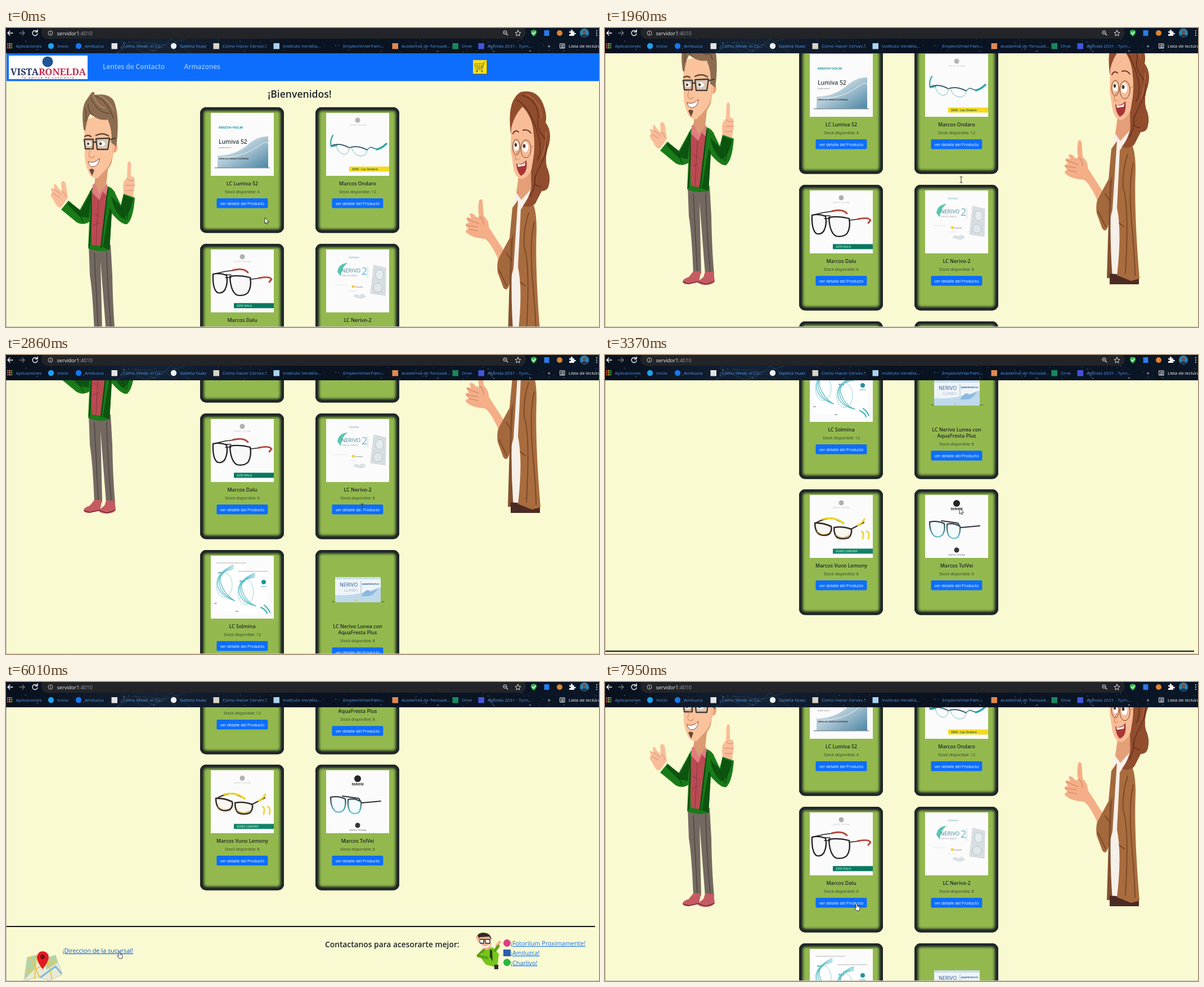
An HTML page for the animation above (8000 ms loop, 1054 by 532 pixels).

```html
<!DOCTYPE html>
<html lang="es">
<head>
<meta charset="utf-8">
<title>Tienda de lentes</title>
<style>
html, body { margin: 0; width: 100%; height: 100%; overflow: hidden; background: #fafad2; }
svg { display: block; position: absolute; left: 0; top: 0; }
text { font-family: "Open Sans", "Noto Sans", sans-serif; white-space: pre; }
</style>
</head>
<body>
<svg id="stage" width="1054" height="532" viewBox="0 0 1054 532"></svg>
<script>
const path = (d, fill = 'none', stroke = 'none', w = 1) =>
  `<path d="${d}" fill="${fill}" stroke="${stroke}" stroke-width="${w}" stroke-linecap="round" stroke-linejoin="round"/>`;
const line = (d, color, w) => path(d, 'none', color, w);
const rect = (x, y, w, h, fill, r = 0) => `<rect x="${x}" y="${y}" width="${w}" height="${h}" rx="${r}" fill="${fill}"/>`;
const oval = (x, y, rx, ry, fill, extra = '') => `<ellipse cx="${x}" cy="${y}" rx="${rx}" ry="${ry}" fill="${fill}" ${extra}/>`;
const dot = (x, y, r, fill) => oval(x, y, r, r, fill);
const text = (x, y, size, str, fill, extra = '') => `<text x="${x}" y="${y}" font-size="${size}" fill="${fill}" ${extra}>${str}</text>`;
const move = (x, y, body) => `<g transform="translate(${x} ${y})">${body}</g>`;
const MID = ' text-anchor="middle" ', SEMI = ' font-weight="600" ', BOLD = ' font-weight="700" ', ITALIC = ' font-style="italic" ';

const defs = `<defs>
  <clipPath id="round"><rect width="149" height="223.5" rx="11"/></clipPath>
  <filter id="soft" x="-20%" y="-20%" width="140%" height="140%"><feGaussianBlur stdDeviation="2"/></filter>
  <linearGradient id="wave" x2="1" y2="1"><stop stop-color="#e9f0f3"/><stop offset=".45" stop-color="#b4ccd9"/><stop offset="1" stop-color="#4c86a4"/></linearGradient>
  <linearGradient id="fade" x2="0" y2="1"><stop stop-color="#222b33"/><stop offset="1" stop-color="#69c9e0"/></linearGradient>
  <linearGradient id="bar" x2="1"><stop stop-color="#080f1c"/><stop offset=".25" stop-color="#142235"/><stop offset=".5" stop-color="#091220"/><stop offset="1" stop-color="#0b1626"/></linearGradient>
</defs>`;

// Product pictures, each 112 by 112.
const white = rect(0, 0, 112, 112, '#fbfbfb');
const shopMark = (y, color) => dot(56, y, 4.5, color) + text(56, y + 10, 3.2, 'LENTES TESORA', color, MID + 'letter-spacing=".5"');
const banner = (fill, ink, str) => rect(41, 95.5, 71, 9, fill) + text(46, 102, 5.2, str, ink, BOLD);

const pictures = [
  white + text(14, 27.5, 6, 'KRESTA+VOLM', '#1497a5', BOLD) +
    path('M12 76Q46 76 70 53Q86 41 102 42V97H12Z', 'url(#wave)') +
    line('M20 80Q58 78 80 62T102 56', '#eef4f7', 1) +
    text(14, 55, 10.3, 'Lumiva 52', '#333e45', SEMI) + text(14, 63, 4, '(polimacon)', '#777') +
    text(14, 83, 3.3, 'LENTES DE CONTACTO ESFERICAS', '#333', BOLD) +
    rect(7, 97, 98, 1.5, '#7b9099'),
  white + shopMark(13, '#b5b5b5') +
    line('M12 40Q6 50 9 60L19 58', '#30a5a8', 2.2) +
    line('M10 58Q25 53 41 62Q56 57 73 66', '#234e60', 1.7) +
    line('M18 58Q20 71 32 74Q41 73 41 62M45 62Q49 76 62 77Q73 75 73 66', '#77bdc3', 1) +
    line('M73 65L79 61L91 65', '#326f79', 1.4) + line('M90 65Q99 63 107 55', '#30a5a8', 3.4) +
    banner('#f5d91f', '#376c38', '$850 - Las Ondaro'),
  white + shopMark(13, '#b0b0b0') +
    path('M4 44Q16 41 28 46Q31 60 25 72Q20 79 12 77Q3 71 4 44ZM34 48Q51 45 70 50Q73 66 66 77Q58 84 46 81Q35 74 34 48Z', '#f8f8f8', '#211f22', 2.3) +
    line('M4 44L26 39L43 37M26 45H36M26 50H36M71 53L88 51', '#211f22', 1.6) +
    line('M39 37Q58 32 66 41M85 51Q104 47 108 53L104 58', '#b4483c', 3) +
    banner('#09775f', '#8be1c8', '$255 DALU'),
  white + text(40, 16, 4.5, 'clarivona', '#6fa9b4', ITALIC) +
    path('M20 40Q22 25 38 24Q27 32 26 48Z', '#56c6b0') +
    text(27, 41, 9.6, 'NERIVO', '#4b8399') + text(63, 45, 18, '2', '#65b6d2') +
    text(28, 48, 2.7, 'LENTES DE CONTACTO', '#8a9ca2') +
    line('M74 30V50', '#aaa', .5) + dot(48, 66, 2.5, '#f4cf35') + text(51, 68, 3.7, 'Visanela', '#666') +
    path('M85 28L106 33L105 82L79 78L82 52Z', '#d7dee1', '#c2cbd0', .6) +
    oval(95, 45, 7, 9, '#e6ecee', 'stroke="#b8c3c8"') + oval(92, 68, 8, 8, '#e0e6e9', 'stroke="#b8c3c8"') +
    path('M48 84Q53 76 59 82Q66 75 71 85L62 88Z', '#dae1e4') + line('M14 63H37M40 74H54', '#d4dadd', .7),
  white + rect(9, 13, 50, 85, '#fff') + rect(48, 28, 53, 76, '#fff') +
    line('M11 13H62M50 28H101', '#d6d6d6', 2.2) +
    [0, 38].map(x => text(13 + x, 32 + x / 2.6, 6, 'soli', '#17879a', BOLD) +
      [0, 3, 6].map(k => line(`M${40 + x} ${17 + x / 2.6 + k}Q${11 + x} ${30 + x / 3} ${12 + x + k} ${50 + x / 3}T${42 + x} ${80 + x / 4}`, '#4eb9c4', 1.2)).join('') +
      oval(24 + x, 52 + x / 3, 14, 22, 'none', 'stroke="#93d3d7"')).join('') +
    dot(94, 47, 4, '#21949e') + text(94, 56, 3, 'solmina', '#17879a', MID) +
    line('M89 92Q99 97 100 103M95 88Q103 95 105 101', '#38b5bc', 2) + line('M7 85H10M45 99H48', '#888', 1.5),
  line('M11 82H103', '#657c3e', 1.5) + rect(16, 38, 81, 45, '#eef4f8') + rect(16, 38, 81, 4, '#c9dfeb') +
    path('M16 70Q52 73 97 56V83H16Z', '#bed9eb') + path('M62 72Q72 56 79 64Q87 62 93 57Q85 71 75 72Z', '#8bb9df') +
    text(24, 55, 9, 'NERIVO', '#245797') + text(32, 64, 8, 'LUNEA', '#7791a5', 'font-weight="300"') +
    line('M62 45V66', '#708ca3', .6) + text(64, 52, 3.3, 'AQUAFRESTA PLUS', '#234f88', BOLD) + dot(53, 80, 2, '#d9cc65'),
  white + shopMark(14, '#b0b0b0') +
    line('M9 51Q27 40 43 42L60 50M73 61L96 49', '#393027', 2.2) +
    line('M23 43Q47 38 60 51M85 54Q92 52 97 43', '#efd51c', 3) +
    path('M9 50Q23 49 38 56Q40 64 34 70Q26 74 17 70Q9 65 9 50ZM43 58Q58 55 74 61Q75 71 69 76Q59 80 49 76Q43 71 43 58Z', '#f8f6f0', '#352b24', 2.6) +
    line('M13 65Q22 74 34 68M46 71Q57 80 70 72', '#c0952c', 1.2) +
    line('M92 65Q97 66 94 78M101 65Q107 66 104 78', '#efd647', 3) +
    banner('#128268', '#8ee1b7', 'VUNO LEMONY'),
  white + dot(56, 15, 6, '#242424') + text(56, 27, 6.5, 'tolveia', '#222', MID + BOLD + ITALIC) +
    line('M29 46L58 50L63 58M64 58L97 55', '#303138', 2) +
    path('M8 48Q21 45 34 51Q36 63 31 71Q24 77 16 73Q8 66 8 48ZM39 52Q51 49 62 56Q63 68 58 75Q50 80 43 74Q38 68 39 52Z', '#f2fafb', 'url(#fade)', 2.2) +
    shopMark(98, '#353535')
];

const titles = [['LC Lumiva 52'], ['Marcos Ondaro'], ['Marcos Dalu'], ['LC Nerivo-2'], ['LC Solmina'],
  ['LC Nerivo Lunea con', 'AquaFresta Plus'], ['Marcos Vuno Lemony'], ['Marcos TolVei']];
const stock = [4, 12, 6, 8, 12, 8, 8, 6];

const card = i => {
  const names = titles[i], drop = (names.length - 1) * 11.2;
  return move(345 + i % 2 * 205, [141, 384, 627, 869][i >> 1],
    `<g clip-path="url(#round)">${rect(0, 0, 149, 223.5, '#93b94e')}
      <rect width="149" height="223.5" rx="11" fill="none" stroke="#1d2520" stroke-width="13" filter="url(#soft)"/></g>
      <rect x="2" y="2" width="145" height="219.5" rx="9" fill="none" stroke="#20272a" stroke-width="4"/>` +
    move(19, 10, pictures[i]) +
    names.map((s, k) => text(75, 138.5 + k * 11.2, 8.9, s, '#212529', MID + SEMI)).join('') +
    move(0, drop, text(75, 152.6, 7.1, 'Stock disponible: ' + stock[i], '#35402c', MID) +
      rect(29.4, 162, 91, 17.5, '#0d6efd', 2) + text(75, 173.6, 7.1, 'ver detalle del Producto', '#fff', MID)));
};

const man =
  path('M147 386H186L189 440Q190 500 194 543H178L168 415L171 542H157Q154 470 149 440Z', '#736961') +
  line('M157 400Q160 465 164 538M179 398Q180 460 187 538', '#514943', 1.6) +
  path('M157 538H171L168 551L167 557L148 561Q138 561 138 556Q139 551 149 548ZM178 539H193L195 555Q192 562 180 562Q166 562 165 556L175 548Z', '#c55b62') +
  line('M139 557L149 560L167 556M166 557L180 561L194 556', '#762f39', 1.5) +
  path('M98 319Q91 321 86 309L80 299Q78 296 82 294L80 286Q81 283 86 287L85 278Q88 276 92 284L99 291L98 275Q102 269 106 276L110 302Z', '#f9bd99') +
  line('M83 294L95 301M86 287L98 296M100 291Q105 292 106 300', '#d08d70', 1) +
  path('M209 300L208 279Q209 271 215 267L216 240Q220 234 222 241V264Q230 265 228 271L229 281L227 289L226 302Z', '#f9bd99') +
  line('M215 267Q219 274 228 271M213 280H228M213 289H227', '#ce8b6e', 1) +
  path('M153 284L179 281Q191 284 195 296L204 315L209 295L229 302Q226 341 215 349Q206 351 188 330L184 395Q165 400 146 392L148 345Q137 352 126 346L98 323L111 307L131 324Z', '#197b18') +
  path('M152 290L133 325L112 309L109 314L130 335L147 338ZM187 300Q191 325 207 339Q219 335 226 304L209 297L205 318ZM172 390L184 320L188 325L184 395Z', '#0d5410') +
  path('M155 280L178 280L178 305Q173 340 168 388L153 386Q150 335 153 300Z', '#ba4a52') +
  path('M160 254L181 252L178 280L166 297L157 279Z', '#dc9a72') +
  path('M154 279L158 276L166 295L180 277L181 300L172 291L166 306L153 293Z', '#df7d80') +
  line('M164 306L160 386M156 330L167 336M155 351L166 347', '#853640', 1) +
  line('M181 287L169 390M150 291Q154 320 148 388', '#0b4512', 2) +
  line('M129 328L137 345M204 322L213 342M218 320L215 340', '#0a4711', 1.3) +
  oval(192, 212, 6, 10, '#eca27c') +
  path('M139 165Q166 150 192 170Q195 220 187 240Q176 259 163 267Q151 269 146 255Q138 235 140 218Z', '#fac39b') +
  path('M190 205Q191 232 182 246Q174 256 163 267Q180 259 188 239Z', '#dc9c75') +
  path('M138 181Q133 146 141 131L147 122L152 115Q157 111 158 119Q183 115 192 130Q203 158 196 211L187 204Q190 184 181 163Q165 166 150 153Q144 160 141 183Z', '#8c6c50') +
  line('M146 136Q146 148 154 155M151 126Q165 152 184 152M159 121Q181 130 191 161M141 144Q144 155 141 166', '#5f4636', 1.5) +
  line('M155 117Q160 138 176 143M165 120Q183 127 192 148', '#b08c6c', 1.5) +
  line('M140 193Q145 189 151 193M160 191Q172 185 182 192', '#654631', 2.5) +
  path('M139 198H155V215H141ZM160 197L184 196L181 216H162Z', '#d9c7b4', '#493c36', 2.3) + line('M155 203H160M184 199L194 196', '#493c36', 2.3) +
  oval(147, 206, 4.5, 4, '#fff') + oval(170, 206, 6, 4.5, '#fff') + dot(146, 206, 2.2, '#543c2c') + dot(168, 206, 2.4, '#543c2c') +
  line('M153 211Q145 224 148 229Q153 233 157 228', '#d98e68', 1.3) +
  path('M146 238Q157 242 166 232Q165 247 153 247Q147 245 146 238Z', '#fff', '#8a4636', 1) +
  path('M148 252Q153 248 157 253L153 263Z', '#6a4a36');

const woman =
  path('M915 114Q947 107 957 142Q962 158 959 168Q971 184 965 208Q957 229 961 247Q969 265 965 278Q962 290 952 290L940 313Q928 322 919 316Q925 295 921 270L897 186Q890 128 915 114Z', '#914d2d') +
  path('M912 257L933 250L934 300L920 316L906 300Z', '#e59f78') +
  path('M906 292L916 306L933 287L935 326Q917 432 915 543L897 544Q891 430 896 350Z', '#f6f0e9') +
  path('M885 436Q865 383 851 375Q835 374 825 369L818 364Q815 359 822 358L817 351Q816 347 823 347L818 339Q821 335 827 339L824 331Q829 327 835 336L841 337Q838 319 841 307Q843 302 847 307L849 334Q859 344 858 354L897 415Z', '#f4ae88') +
  line('M818 351L838 354M820 340L840 348M823 358L839 361M841 335Q848 338 849 350', '#c98060', 1.2) +
  path('M910 306L900 320L895 374L875 411Q872 421 874 435L884 462Q890 470 894 458L902 428L908 335Z', '#a3683c') +
  path('M897 378L892 550L902 550Q895 460 902 366Z', '#83502f') +
  path('M897 542L949 546V561H897Z', '#4b2b23') +
  path('M915 323L929 301Q943 312 943 358Q940 431 950 551L935 555L910 545Q919 468 910 425Z', '#a86c3e') +
  line('M876 430L890 459M889 400L899 414M929 329Q919 360 921 390Q932 420 925 542M939 345Q930 380 936 450T942 546M914 452L923 459', '#754424', 1.6) +
  path('M898 174Q900 149 918 138Q938 152 942 187L940 229Q936 261 918 269Q906 268 902 249L897 217Z', '#f8bd97') +
  path('M918 140Q936 158 938 190Q941 214 936 240Q932 258 936 272Q932 300 919 316Q930 322 941 312L952 290Q964 290 965 278Q968 262 961 247Q957 229 965 205Q970 185 959 168L957 142Q945 112 915 114Q893 126 897 184Q901 158 918 140Z', '#914d2d') +
  line('M917 120Q944 126 946 158Q941 177 955 193T949 246T951 282M908 128Q928 138 942 178T944 235M932 300Q942 280 940 263', '#633020', 1.5) +
  line('M925 118Q951 130 952 160M960 185Q960 210 953 230', '#b06a42', 1.5) +
  line('M901 188Q905 180 911 185M919 182Q927 179 933 187', '#6b3423', 2) +
  oval(907, 210, 4.5, 8, '#fff') + oval(923, 212, 5.5, 9, '#fff') + oval(906, 208, 2.2, 3.2, '#543a2b') + oval(921, 210, 2.4, 3.4, '#543a2b') +
  oval(907, 212, 6.5, 14, 'none', 'stroke="#70432f"') + oval(924, 215, 9, 16, 'none', 'stroke="#70432f"') +
  line('M933 213L938 209M910 219Q902 230 907 235L912 233', '#d28b69', 1.3) +
  path('M907 241Q917 245 925 235Q928 258 915 263Q908 256 907 241Z', '#a93736') + path('M909 242Q917 245 923 239L922 245L910 247Z', '#fff');

const navbar = rect(0, 45, 1054, 49.5, '#0d6efd') + rect(5, 49, 140, 42, '#fff') + dot(74, 60, 9.5, '#1c5596') +
  text(75, 84, 16.6, 'VISTA<tspan fill="#c22a4c">RONELDA</tspan>', '#233565', MID + BOLD + 'style="font-family:\'Noto Serif\',serif"') +
  text(75, 89.5, 6, 'Tu óptica de confianza', '#863848', MID + ITALIC + 'letter-spacing="1.6"') +
  text(172, 73, 11.9, 'Lentes de Contacto', '#9cc5ff', SEMI) + text(316.5, 73, 11.9, 'Armazones', '#9cc5ff', SEMI) +
  rect(830, 57, 25, 25, '#f7df18') + line('M830 82H855V57', '#444022', .8) +
  line('M853 60L850 61L846 74H835M833 64L849 63L847 71L836 72ZM837 64L839 72M842 64V72M846 64L845 71M834 68H848', '#777026', .8) +
  dot(837, 77, 1.5, '#5f5a20') + dot(846, 77, 1.5, '#5f5a20');

const link = (x, y, str, id = '') => text(x, y, 10.9, str, '#0d6efd', `text-decoration="underline" ${id}`);
const footer = move(0, 722,
  rect(0, 434, 1047, 2, '#111') +
  text(567, 472, 13.8, 'Contactanos para acesorarte mejor:', '#212529', SEMI) +
  link(100.5, 482, '¡Direccion de la sucursal!', 'id="address"') +
  link(897, 469, '¡Fotorilum Proximamente!') + link(897, 486, '¡Amiluzca!') + link(897, 503.5, '¡Charlivo!') +
  dot(890.5, 464.5, 6.5, '#d83f83') + rect(884, 476, 13, 12, '#285fb0') + dot(890.5, 499, 6.5, '#2bb641') +
  path('M38 490L54 486L69 492L88 486L100 521L77 531L58 525L32 532Z', '#e8ead5', '#c6cbb9', 1) +
  path('M38 490L54 486L51 511L33 529ZM69 492L88 486L91 500L72 512Z', '#b2d3a3') +
  line('M35 516L91 497M43 489L60 526M74 492L82 529M54 487L51 528', '#f0c64e', 2) + line('M62 525L88 506L98 518', '#7bb9d7', 3) +
  path('M65 511Q54 496 55 489Q57 479 65 479Q75 480 76 489Q76 497 65 511Z', '#e21b22') + dot(65, 489, 4, '#6f1518') +
  path('M850 474L865 472L876 484L873 508L853 503L844 491Z', '#76c51c') + path('M870 476L881 462L876 460L870 468Z', '#f2b68d') +
  line('M849 477L839 487L855 491M869 478L875 470', '#5ba310', 5) + path('M860 476L864 477L865 497L860 489Z', '#26391c') + rect(868, 503, 7, 8, '#303030') +
  path('M840 454Q850 449 861 454L862 469Q858 481 848 474Z', '#f0b58c') + path('M838 459Q835 447 847 446Q862 446 863 459L859 453L842 454Z', '#332b28') +
  path('M841 458H849V465H843ZM851 458H860V465H853Z', '#fff', '#25211f', 1.4) + line('M846 470Q854 474 859 468', '#fff', 2) +
  line('M840 460L837 453', '#f0b58c', 4));

// Browser bars
let seed = 7;
const rand = () => (seed = seed * 16807 % 2147483647) / 2147483647;
const stars = Array.from({length: 130}, () => dot(rand() * 1054, 19 + rand() * 25, .2 + rand() * .65, ['#5d8daa', '#36546c', '#a7bdc9'][rand() * 3 | 0])).join('');
const bookmarks = [
  [91, 'Inicio', '#1da1f2', 1], [140, 'Amiluzca', '#1877f2', 1], [204, '¿Cómo Medir el Co...', '#e4e4e4', 0],
  [309, 'Galleta Nuez', '#f1f1f1', 1], [385, 'Cómo Hacer Cervez...', '#d8d2c7', 0], [492, 'Instituto Verdela...', '#a7d4f2', 0],
  [599, 'EmpleoVirtal Pam...', '', 0], [703, 'Academia de Torcuad...', '#df8950', 0], [810, 'Orve', '#16885f', 0], [856, 'Agenda 2031 - Turn...', '#4355d8', 0]
];
const bars = rect(0, 0, 1054, 45, 'url(#bar)') + stars +
  line('M197 45L228 25L264 42L294 19L328 44M205 23L249 45L281 30L318 20M228 25L281 30L303 43', '#45677e88', .7) +
  rect(63, -4, 861, 23, '#222428', 11) +
  line('M12 9H3M7 5L3 9L7 13', '#fff', 1.3) + line('M24 9H33M29 5L33 9L29 13', '#74777b', 1.3) +
  line('M55 6A4.5 4.5 0 1 0 56 10M56 3V7H52', '#f3f3f3', 1.4) +
  oval(79, 9, 4, 4, 'none', 'stroke="#bfc1c4"') + line('M79 8.7V11M79 6.8V7', '#ccc', 1) +
  text(90.5, 12.5, 9.1, 'servidor1<tspan fill="#9fa2a6">:4010</tspan>', '#f0f0f0') +
  oval(887, 8, 3.2, 3.2, 'none', 'stroke="#ddd"') + line('M889.5 10.5L892 13M885.5 8H888.5', '#ddd', 1.1) +
  line('M910 4L911.5 7.5L915 8L912.2 10.4L913 14L910 12L907 14L907.8 10.4L905 8L908.5 7.5Z', '#e5e5e5', 1) +
  path('M933 5L938 3L943 5Q944 11 938 15Q932 11 933 5Z', '#35b64b') + line('M935.5 8.5L937.5 11L941 7', '#fff', 1.3) +
  rect(956.5, 4, 9, 10, '#297bea') + dot(984, 9, 5, '#df852e') +
  path('M1001 6H1004Q1003 3 1005 3Q1008 3 1007 6H1010V9Q1013 8 1013 10Q1013 12 1010 11V14H1001V11Q1004 11 1004 9.5Q1004 8 1001 8Z', '#f3f3f3') +
  dot(1028, 9, 8, '#2386b8') + dot(1028, 7, 3.3, '#7a5140') + path('M1022 14Q1028 8 1034 14L1031 16.5H1025Z', '#283447') +
  [5, 9, 13].map(y => dot(1050, y, 1, '#fff')).join('') +
  Array.from({length: 9}, (_, i) => rect(2 + i % 3 * 3.5, 27 + (i / 3 | 0) * 3.5, 2.3, 2.3, ['#e64c40', '#f0bd35', '#46a85b'][i % 3])).join('') +
  text(17.5, 35, 8, 'Aplicaciones', '#5298ea') +
  bookmarks.map(([x, s, color, round]) => text(x, 35, 8, s, '#5298ea') +
    (color && (round ? dot(x - 11, 32, 5.2, color) : rect(x - 16.5, 27, 10.5, 10.5, color)))).join('') +
  text(963, 34.5, 9, '»', '#fff') + line('M985 28H993V36H985ZM987 30.5H991M987 32.5H991M987 34.5H991', '#f3f3f3', 1) +
  text(1000, 35, 8, 'Lista de lectura', '#fff');

const pointers = {
  arrow: path('M0 0V10L2.4 7.8L4 11L5.6 10.2L4.1 7.2H7.2Z', '#fff', '#111', .8),
  beam: line('M-2 -5H2M0 -5V5M-2 5H2', '#333', 1),
  hand: path('M2 1Q3.5 -.8 4.3 1V5L8 6Q9.5 6.5 9 9L8 13H3L0 9Q-.7 7 2 8Z', '#fff', '#111', .8)
};

const stage = document.getElementById('stage');
stage.innerHTML = defs + `<g id="page">${navbar}${text(522, 124, 17.6, '¡Bienvenidos!', '#212529', MID + SEMI)}
  ${man}${woman}${titles.map((_, i) => card(i)).join('')}${footer}</g>` +
  rect(0, 45, 1, 487, '#b9b9ae') + rect(0, 531, 1054, 1, '#c8c8b9') + bars + '<g id="pointer"></g>';

// The screen refreshes only at these times (ms).
const ticks = [0, 150, 270, 420, 570, 720, 840, 990, 1110, 1230, 1350, 1470, 1590, 1840, 1960, 2100, 2220, 2620, 2740, 2860,
  3110, 3250, 3370, 3490, 3610, 3760, 4040, 4180, 4300, 4420, 4540, 4690, 4810, 4960, 5080, 5200, 5320, 5470, 5590, 5740,
  5890, 6010, 6280, 6400, 6530, 6650, 6790, 6910, 7030, 7180, 7320, 7440, 7560, 7680, 7830, 7950];
const scrollKeys = [[0, 0], [1590, 0], [1840, 35], [1960, 105], [2100, 133], [2220, 140], [2620, 176], [2740, 245], [2860, 280],
  [3110, 330], [3250, 490], [3370, 630], [3490, 660], [3610, 700], [3760, 722], [6010, 722], [6280, 705], [6400, 680],
  [6650, 652], [6790, 582], [6910, 440], [7030, 371], [7180, 200], [7680, 162]];
const pointerKeys = [[0, 460, 338, 'arrow'], [270, 468, 328, 'arrow'], [420, 477, 322, 'arrow'], [570, 513, 269, 'arrow'],
  [720, 470, 256, 'arrow'], [840, 433, 304, 'arrow'], [990, 374, 321, 'arrow'], [1110, 430, 315, 'arrow'], [1350, 600, 310, 'arrow'],
  [1470, 644, 285, 'arrow'], [1590, 633, 270, 'beam'], [3110, 633, 270, 'beam'], [3250, 630, 273, 'arrow'], [3490, 630, 273, 'arrow'],
  [3760, 628, 297, 'arrow'], [4040, 642, 341, 'arrow'], [4540, 926, 459, 'hand'], [4810, 948, 510, 'hand'], [4960, 850, 512, 'arrow'],
  [5320, 447, 513, 'arrow'], [5590, 351, 478, 'arrow'], [5740, 234, 478, 'arrow'], [5890, 215, 478, 'hand'], [6010, 198, 479, 'hand'],
  [6280, 198, 479, 'arrow'], [7030, 405, 376, 'arrow'], [7180, 405, 376, 'arrow'], [7680, 480, 317, 'arrow'], [7830, 466, 350, 'arrow'], [7950, 444, 394, 'hand']];

function sample(keys, t) {
  const i = keys.findLastIndex(k => k[0] <= t), a = keys[i], b = keys[i + 1] || a;
  const u = a === b ? 0 : (t - a[0]) / (b[0] - a[0]);
  return a.map((v, j) => typeof v === 'number' ? v + (b[j] - v) * u : v);
}

const page = document.getElementById('page');
const pointer = document.getElementById('pointer');
const address = document.getElementById('address');
const start = performance.now();
let shown = -1;

function draw() {
  const now = (performance.now() - start) % 8000;
  const t = ticks.findLast(k => k <= now);
  if (t !== shown) {
    shown = t;
    const [, x, y, kind] = sample(pointerKeys, t);
    page.setAttribute('transform', `translate(0 ${-Math.round(sample(scrollKeys, t)[1])})`);
    pointer.innerHTML = move(x, y, pointers[kind]);
    address.setAttribute('fill', t >= 5890 && t < 6280 ? '#0a58ca' : '#0d6efd');
  }
  requestAnimationFrame(draw);
}
draw();
</script>
</body>
</html>
```
